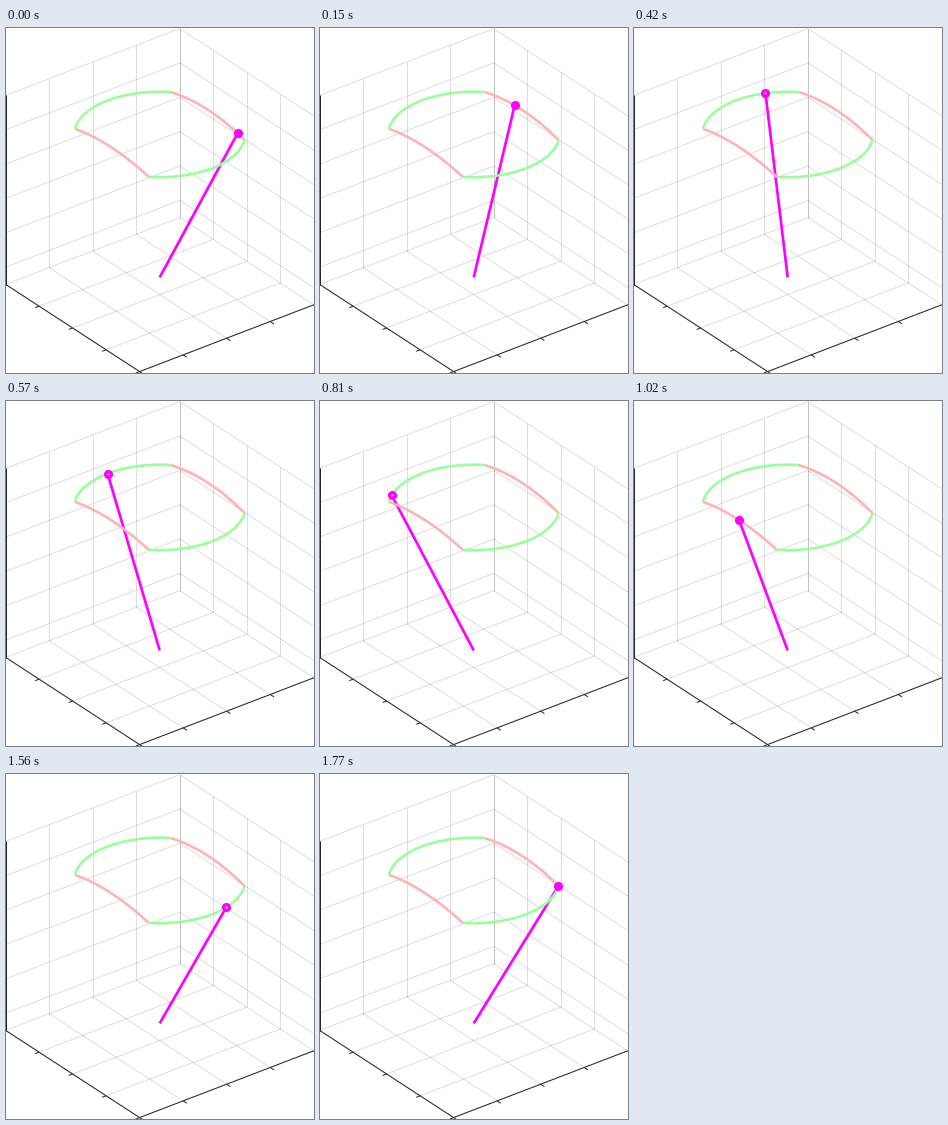
A matplotlib script for the animation above (1800 ms loop, 308 px wide and 345 px high).

```python
import numpy as np
import matplotlib.pyplot as plt
from matplotlib.animation import FuncAnimation

W, H, DPI = 308, 345, 100
FRAMES, INTERVAL = 60, 30
PX = 72 / DPI                       # points per pixel

# Screen vectors of the axes, seen from azimuth -37.5, elevation 30
ORIGIN = np.array([153.7, 249.4])
EX = np.array([87.1, -33.4])
EY = np.array([-67.0, -43.6])
EZ = np.array([0, -171.8])
Z_MIN, Z_MAX = -0.1, 1.0

RADIUS, HEIGHT = 0.778, 0.832       # circle carrying the green arcs
SIDE = RADIUS / np.sqrt(2)
SWING = np.radians(22)              # half angle of the pink arcs
RISE, BULGE = 0.034, 0.007          # their height upwards and outwards

INK = "#262626"
GREEN, PINK, MAGENTA = "#99ff99", "#ffb3b3", "#ff00ff"


def project(x, y, z):
    return ORIGIN + np.multiply.outer(x, EX) + np.multiply.outer(y, EY) + np.multiply.outer(z, EZ)


def green_arc(s, start):
    a = np.radians(start + 90 * np.asarray(s))
    return project(RADIUS * np.cos(a), RADIUS * np.sin(a), HEIGHT + 0 * a)


def pink_arc(s, side):
    """Swing from the corner y = -side to y = +side."""
    a = SWING * (2 * np.asarray(s) - 1)
    arch = (np.cos(a) - np.cos(SWING)) / (1 - np.cos(SWING))
    y = side * SIDE * np.sin(a) / np.sin(SWING)
    return project(side * (SIDE + BULGE * arch), y, HEIGHT + RISE * arch)


def tip(i):
    """Ten steps on each pink arc, twenty on each green one."""
    half, k = divmod((i + 1) % FRAMES, 30)
    if k <= 10:
        return pink_arc(k / 10, 1 - 2 * half), MAGENTA
    return green_arc((k - 10) / 20, 45 + 180 * half), "none"


fig = plt.figure(figsize=(W / DPI, H / DPI), dpi=DPI, facecolor="white")
ax = fig.add_axes([0, 0, 1, 1])
ax.set_xlim(0, W)
ax.set_ylim(H, 0)
ax.axis("off")


def draw(points, color, width, z, alpha=1):
    x, y = np.transpose(points)
    return ax.plot(x, y, color=color, lw=width * PX, zorder=z, alpha=alpha,
                   solid_capstyle="butt")[0]


def edge(a, b):
    draw([project(*a), project(*b)], INK, 1, 2)


def grid(a, b):
    draw([project(*a), project(*b)], INK, 1, 1, alpha=0.15)


for t in np.linspace(-1, 1, 5):
    grid((t, -1, Z_MIN), (t, 1, Z_MIN))
    grid((t, 1, Z_MIN), (t, 1, Z_MAX))
    grid((-1, t, Z_MIN), (1, t, Z_MIN))
    grid((1, t, Z_MIN), (1, t, Z_MAX))
    edge((t, -1, Z_MIN), (t, -1.055, Z_MIN))
    edge((-1, t, Z_MIN), (-1.045, t, Z_MIN))
for z in np.linspace(0, 1, 6):
    grid((-1, 1, z), (1, 1, z))
    grid((1, -1, z), (1, 1, z))

edge((-1, -1, Z_MIN), (1, -1, Z_MIN))
edge((-1, -1, Z_MIN), (-1, 1, Z_MIN))
draw([(0.3, 67), (0.3, 257)], INK, 1, 2)

stem = draw([ORIGIN, ORIGIN], MAGENTA, 2.7, 3)
s = np.linspace(0, 1, 60)
for side in (1, -1):
    draw(pink_arc(s, side), PINK, 2.6, 4)
for start in (45, 225):
    draw(green_arc(s, start), GREEN, 2.6, 5)
ring, = ax.plot([], [], "o", ms=5.7 * PX, mec=MAGENTA, mew=3.4 * PX, zorder=6)


def update(i):
    (x, y), fill = tip(i)
    stem.set_data([ORIGIN[0], x], [ORIGIN[1], y])
    ring.set_data([x], [y])
    ring.set_markerfacecolor(fill)
    return stem, ring


anim = FuncAnimation(fig, update, frames=FRAMES, interval=INTERVAL,
                     repeat=True, repeat_delay=0)
plt.show()
```
